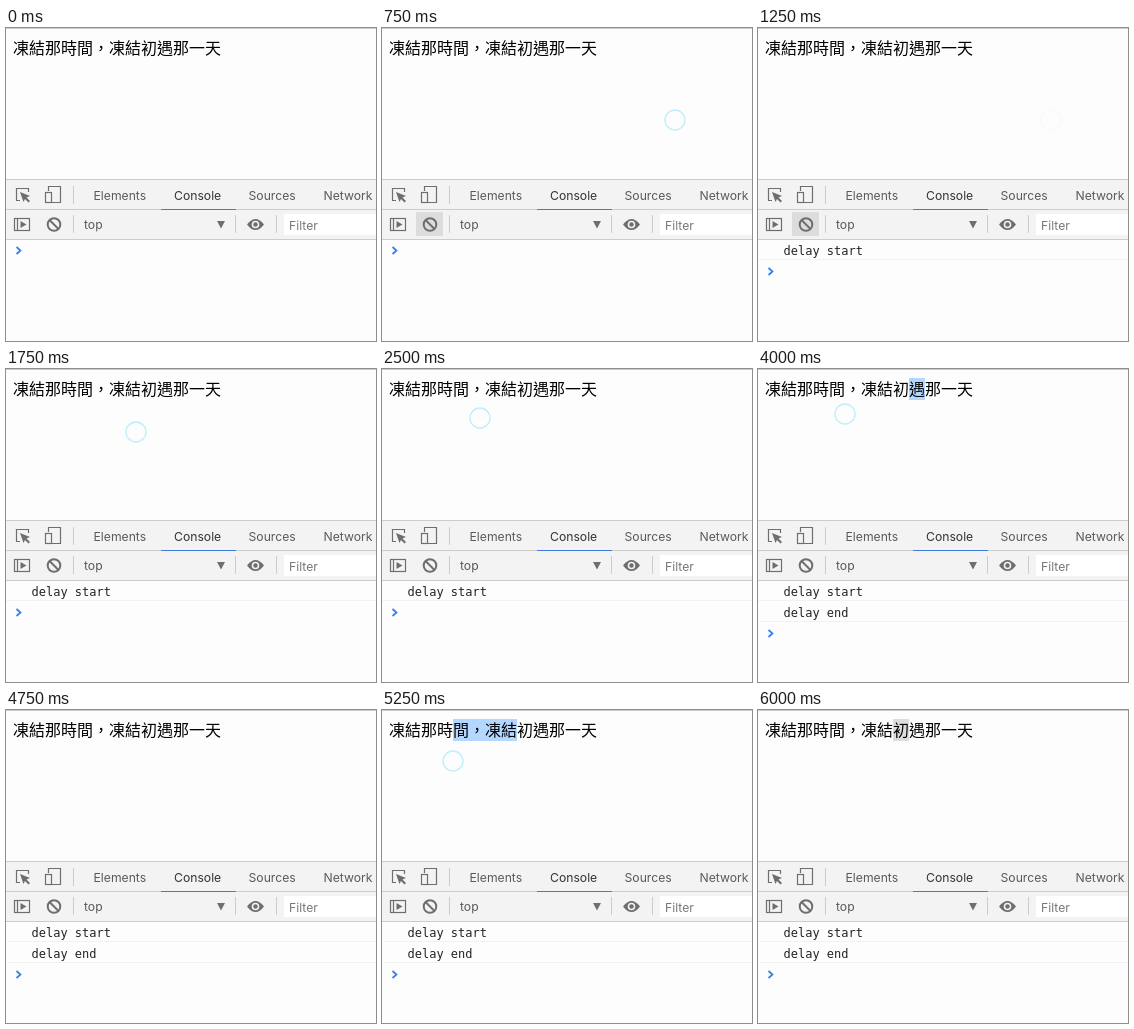
Recreate the animation shown at these times as an HTML page. Size 370 by 313 pixels, loop 6.5 s.

```html
<!DOCTYPE html>
<html lang="zh-Hant">
<head>
<meta charset="utf-8">
<title>Console delay</title>
<style>
html, body { margin: 0; width: 100%; height: 100%; overflow: hidden; background: #fdfdfd; }
svg { display: block; }
.ui { font: 12.2px Inter, "Liberation Sans", sans-serif; fill: #5a5a5a; }
.ui .active { fill: #333; }
.ui .hint { fill: #777; }
.log { font: 12px "DejaVu Sans Mono", monospace; fill: #222; }
.title { font: 16px "Noto Sans CJK TC", "Noto Sans CJK", sans-serif; fill: #000; }
.rule { stroke: #ccc; }
.row { stroke: #eff3f4; }
.icon { fill: none; stroke: #6e6e6e; stroke-width: 1.2; }
.icon .bold { stroke-width: 2; }
.solid { fill: #6e6e6e; }
</style>
</head>
<body>
<svg width="370" height="313" viewBox="0 0 370 313">
  <rect width="370" height="313" fill="#fdfdfd"/>
  <path class="rule" d="M0 .5H370"/>
  <rect id="selection" y="9" height="22"/>
  <text class="title" x="7" y="26">凍結那時間，凍結初遇那一天</text>
  <circle id="ring" r="10" fill="none" stroke="#bdeefc" stroke-width="1.3"/>

  <!-- toolbars -->
  <rect y="151" width="370" height="61" fill="#f3f3f3"/>
  <path class="rule" d="M0 151.5H370M0 181.5H370M0 211.5H370M67.5 158V176M67.5 187V205M229.5 187V205M270.5 187V205"/>
  <rect x="155" y="181" width="75" height="1" fill="#3f7be0"/>
  <rect id="hover" x="34" y="184" width="27" height="24" fill="#dcdcdc"/>
  <rect x="278" y="186" width="92" height="21" fill="#fff"/>

  <g class="ui">
    <text x="87.5" y="172">Elements</text>
    <text x="168" y="172" class="active">Console</text>
    <text x="242.5" y="172">Sources</text>
    <text x="317.5" y="172">Network</text>
    <text x="78" y="201">top</text>
    <text x="283" y="202" class="hint">Filter</text>
  </g>

  <g class="icon">
    <path d="M14 172.5H10.500V160.500H22.500V164"/>
    <path d="M42.500 163V158.500H54.500V174.500H46"/>
    <rect x="39.5" y="164.5" width="6" height="10"/>
    <rect x="8.5" y="190.5" width="15" height="12"/>
    <path d="M11.5 190.5V202.5"/>
    <path class="bold" d="M43.5 192L52.5 201"/>
    <circle class="bold" cx="48" cy="196.5" r="6.3"/>
  </g>
  <g class="solid">
    <path d="M14 164L24 168L20.500 169.500L24 173L22.500 174.500L19 171L17.500 174Z"/>
    <path d="M14.500 193L20.500 196.500L14.500 200Z"/>
    <path d="M211 193H219L215 200.500Z"/>
    <path d="M241 196.500Q249.500 185.500 258 196.500Q249.500 207.500 241 196.500Z"/>
    <circle cx="249.5" cy="196.5" r="3.8" fill="#f3f3f3"/>
    <circle cx="249.5" cy="196.5" r="2.2"/>
  </g>

  <!-- console -->
  <g id="start">
    <text class="log" x="25.5" y="227">delay start</text>
    <path class="row" d="M0 231.5H370"/>
  </g>
  <g id="end">
    <text class="log" x="25.5" y="248">delay end</text>
    <path class="row" d="M0 252.5H370"/>
  </g>
  <path id="prompt" d="M10.500 -3.500L14.500 0L10.500 3.500" fill="none" stroke="#367cf1" stroke-width="1.7"/>
</svg>
<script>
const LOOP = 6500, STEP = 250;
const SKIPPED = [500, 1250, 2750, 3750, 6250]; // ticks that keep the previous picture
const TEXT_X = 7, CHAR = 16, ANCHOR = 8;

// turning points of the pointer: time, x, y
const path = [
  [1000, 293, 92], [1750, 130, 63], [2500, 98, 49], [3250, 172, 44],
  [4000, 87, 45], [4500, 138, 45], [5250, 71, 51], [5500, 139, 45]
];

const $ = id => document.getElementById(id);
const set = (id, attrs) => {
  for (const name in attrs) $(id).setAttribute(name, attrs[name]);
};
const show = (id, on) => set(id, { visibility: on ? "visible" : "hidden" });
const within = (t, from, to) => t >= from && t < to;

function pointer(t) {
  const a = path.findLast(p => p[0] <= t) ?? path[0];
  const b = path.find(p => p[0] > t) ?? a;
  const k = a === b ? 0 : (t - a[0]) / (b[0] - a[0]);
  const ease = k * k * (3 - 2 * k);
  return [a[1] + (b[1] - a[1]) * ease, a[2] + (b[2] - a[2]) * ease];
}

// selected range of characters: one clicked word, then a drag from the anchor
function selected(t, x) {
  if (within(t, 4000, 4250)) return [9, 10];
  if (t < 5000) return [0, 0];
  const edge = Math.ceil((x - TEXT_X) / CHAR);
  return [Math.min(edge, ANCHOR), Math.max(edge, ANCHOR)];
}

function draw() {
  const tick = Math.floor(performance.now() % LOOP / STEP) * STEP;
  const t = SKIPPED.includes(tick) ? tick - STEP : tick;
  const [cx, cy] = pointer(t);
  const [from, to] = selected(t, cx);
  const logs = (tick >= 1250) + (tick >= 4000);

  set("ring", { cx, cy, opacity: within(t, 1000, 1500) ? .13 : 1 });
  show("ring", within(t, 750, 4750) || within(t, 5000, 5750));
  set("selection", {
    x: TEXT_X + CHAR * from,
    width: CHAR * (to - from),
    fill: t < 6000 ? "#b3d7ff" : "#dcdcdc"
  });
  show("hover", within(t, 750, 1750));
  show("start", logs > 0);
  show("end", logs > 1);
  set("prompt", { transform: `translate(0 ${222.5 + 21 * logs})` });
  requestAnimationFrame(draw);
}
draw();
</script>
</body>
</html>
```
